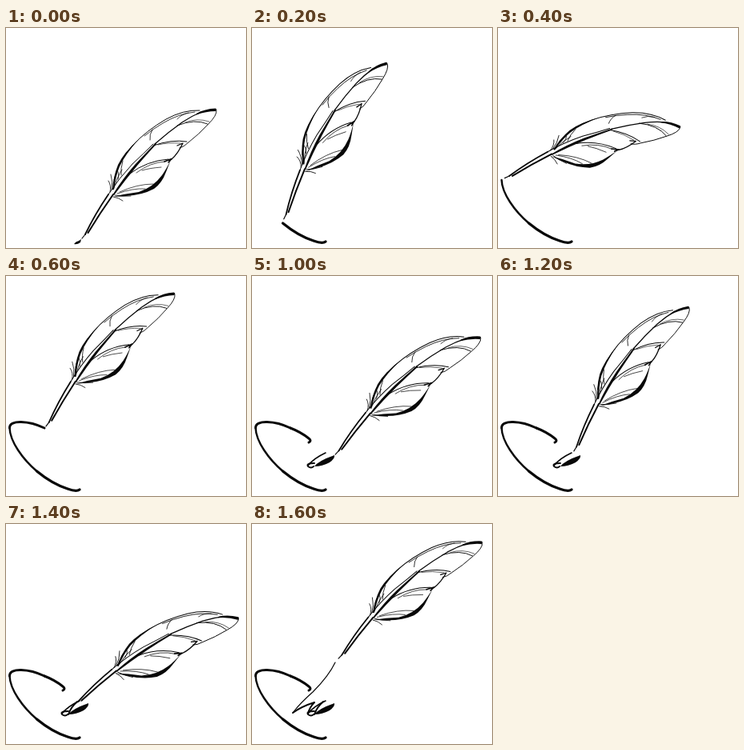
These frames come from a looping animation (300 px wide and 275 px high, 3.4 s). An HTML page with a canvas:

```html
<!DOCTYPE html>
<html lang="en">
<head>
<meta charset="utf-8">
<title>Quill</title>
<style>
html, body { margin: 0; width: 100%; height: 100%; overflow: hidden; background: #fff; }
canvas { display: block; }
</style>
</head>
<body>
<canvas id="stage" width="300" height="275"></canvas>
<script>
const ctx = document.getElementById('stage').getContext('2d');
const LOOP = 3400, STEP = 200;

// The feather is drawn once, between these two points.
const NIB = [94, 264], TIP = [263, 102];

// Nib and tip of the feather at each step.
const poses = [
  [94, 264, 263, 102],
  [39, 240, 169, 44],
  [7, 188, 228, 124],
  [49, 189, 211, 22],
  [78, 237, 299, 163],
  [103, 224, 286, 77],
  [94, 220, 239, 39],
  [84, 226, 291, 118],
  [107, 169, 288, 23]
];

// [line width, path]; width 0 means a filled shape.
const feather = [
  // shaft
  [1.8, 'M128 208 Q111 233 99 258'],
  [1.2, 'M99 258 L95 263'],
  [2, 'M134 208 Q117 232 102.5 256'],
  // spine
  [1, 'M128 208 Q141 188 158 170 Q172 157 184 145'],
  [0, 'M133 209 Q146 188 161 171 Q174 157 187 143.5 L188 145 Q176 158 164 172 Q149 190 135 209 Z'],
  [1.3, 'M186 145 Q203 130 220 118 Q232 110 244 105'],
  [0, 'M238 107 Q248 101 262 100.5 Q264.5 102 262 104 Q250 104 238 108.5 Z'],
  // upper vane
  [1, 'M242 103 Q222 102 200 114 Q176 128 159 146 Q141 165 135 190'],
  [0.8, 'M236 105 Q216 107 196 119 Q184 126 173 135'],
  [0, 'M166 139 Q147 156 140 171 Q134 186 133 202 L135 202 Q137 185 142 173 Q149 158 166 139 Z'],
  [0.8, 'M135 200 Q139 186 145 177'],
  [0.7, 'M228 106 Q219 108 214 114'],
  [0.8, 'M183 127 Q179 133 180 140 M146 166 Q143 176 144 184 M139 178 Q142 182 140 189'],
  // lower vane
  [0.9, 'M263 103 Q264 109 253 120 Q241 133 228 143 Q222 149 217 150'],
  [1.3, 'M214 147 L221 144 Q215 157 207 164'],
  [1.6, 'M198 167 L207 163.5 L203 168'],
  [0, 'M206 165 Q200 177 195 184 Q184 199 166 205 Q150 207 134 211 L150 210 Q170 209 185 201 Q195 194 200 180 Z'],
  [0.9, 'M252 120 Q236 113 214 122'],
  [0.6, 'M254 117 Q239 112 224 118'],
  [1, 'M226 142 Q207 139 184 147'],
  [0.6, 'M218 144 Q203 143 190 146'],
  [1, 'M203 164 Q176 166 155 182'],
  [0.7, 'M199 167 Q180 168 163 181 M194 174 Q180 175 170 178'],
  [0.7, 'M184 195 Q164 195 142 205 M174 201 Q159 200 139 207'],
  // down at the base
  [0.8, 'M131 183 Q134 192 132 202 M128 191 Q132 197 130 205'],
  [0.8, 'M136 209 Q145 211 156 210 M134 211 Q141 212 146 216']
];

// [first step, last step, width, path]; width 0 means a filled shape.
const ink = [
  [0, 0, 0, 'M85 270 Q87 267 91 266 L94 264 L93 268 Q89 271 85 270 Z'],
  [1, 8, 3.3, 'M92 267 Q88 270 77 266 Q58 260 38.5 244'],
  [2, 8, 2.4, 'M38.5 244 C21 229 5 207 4.5 190'],
  [3, 8, 3, 'M4.5 190 C4 179 29 181 48 190'],
  [4, 8, 3, 'M48 190 Q61 195 71 203 Q75 206 71 208'],
  [4, 8, 1.8, 'M78 234 Q67 234 70 238 Q74 241 77 238'],
  [5, 8, 1.6, 'M70 237 Q77 228 92 221'],
  [5, 8, 0, 'M78 238 Q83 231 103 224 Q104 228 97 233 Q88 238 78 238 Z'],
  [7, 8, 2, 'M78 238 Q81 229 89 222'],
  [8, 8, 2, 'M70 237 Q72 229 78 223 Q62 228 51 236'],
  [8, 8, 1.2, 'M51 236 Q60 224 76 210 Q96 190 104 173']
];

const compile = row => row.map(v => typeof v === 'string' ? new Path2D(v) : v);
const featherPaths = feather.map(compile);
const inkPaths = ink.map(compile);

function trace(width, path) {
  if (width) {
    ctx.lineWidth = width;
    ctx.stroke(path);
  } else {
    ctx.fill(path);
  }
}

function drawFeather([nx, ny, tx, ty]) {
  const bx = TIP[0] - NIB[0], by = TIP[1] - NIB[1];
  const dx = tx - nx, dy = ty - ny;
  const scale = Math.hypot(dx, dy) / Math.hypot(bx, by);
  ctx.save();
  ctx.translate(nx, ny);
  ctx.rotate(Math.atan2(dy, dx) - Math.atan2(by, bx));
  ctx.scale(scale, scale);
  ctx.translate(-NIB[0], -NIB[1]);
  for (const [width, path] of featherPaths) trace(width, path);
  ctx.restore();
}

function draw(step) {
  ctx.fillStyle = '#fff';
  ctx.fillRect(0, 0, 300, 275);
  ctx.fillStyle = ctx.strokeStyle = '#080808';
  ctx.lineCap = ctx.lineJoin = 'round';
  for (const [from, to, width, path] of inkPaths) {
    if (step >= from && step <= to) trace(width, path);
  }
  drawFeather(poses[step]);
}

const start = performance.now();
function tick() {
  const t = (performance.now() - start) % LOOP;
  draw(Math.min(poses.length - 1, Math.floor(t / STEP)));
  requestAnimationFrame(tick);
}
tick();
</script>
</body>
</html>
```
